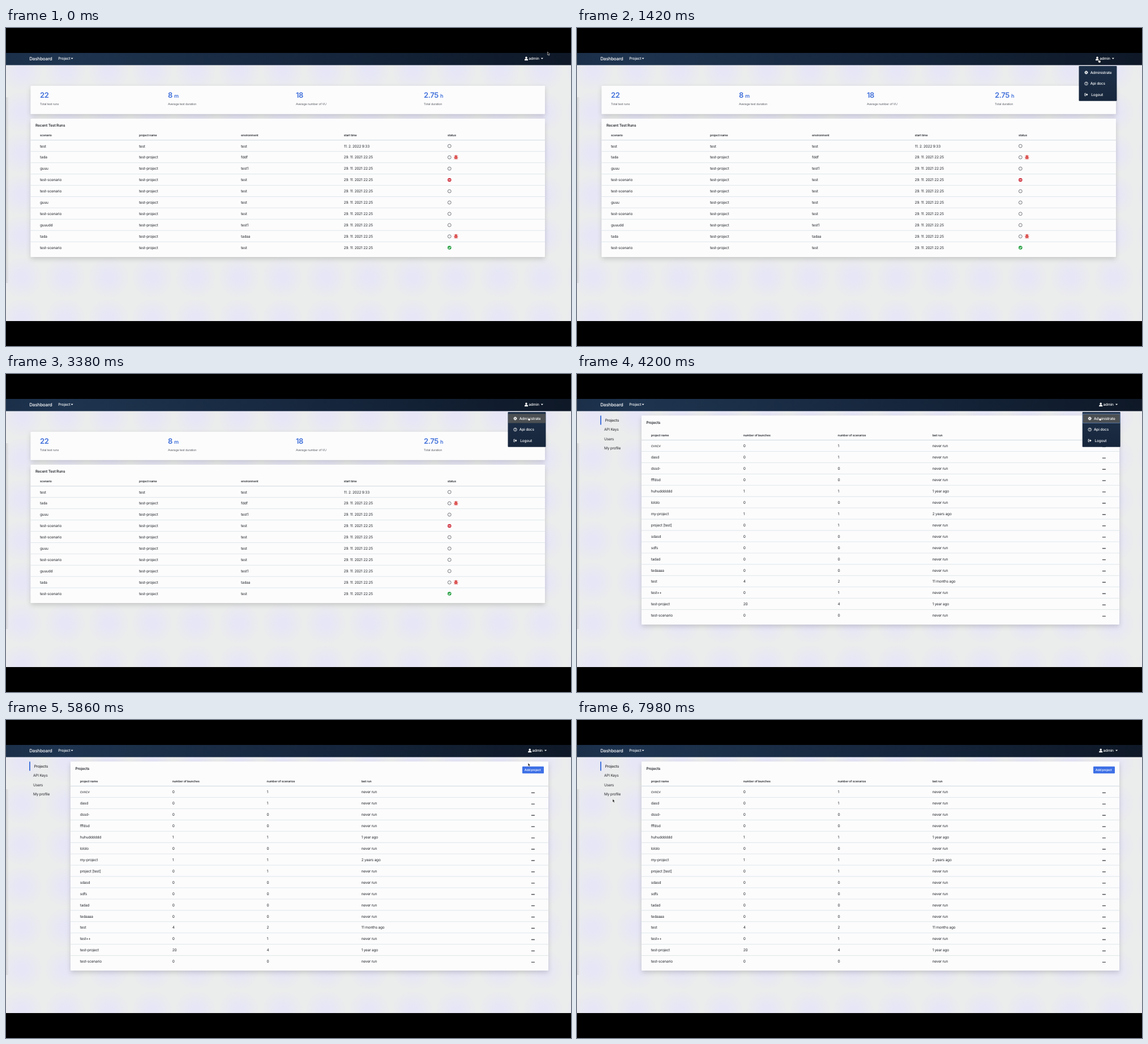
Recreate the animation shown at these times as an HTML page. Size 998x561 px, loop 8000 ms.

```html
<!DOCTYPE html>
<html lang="en">
<head>
<meta charset="utf-8">
<title>Test run dashboard</title>
<style>
  html, body { margin: 0; width: 100%; height: 100%; overflow: hidden; background: #000; }
  svg { display: block; width: 100vw; height: 100vh; }
  text {
    font-family: Inter, "Liberation Sans", sans-serif;
    font-size: 6.5px; letter-spacing: -.03em; fill: #25282c;
    text-rendering: geometricPrecision;
  }
  .title { font-weight: 600; letter-spacing: -.02em; }
  .head { font-size: 5.2px; font-weight: 600; letter-spacing: -.02em; }
  .label { font-size: 5.3px; fill: #5a5d62; }
  .big { font-size: 13px; font-weight: 600; fill: #3f6fda; }
  .unit { font-size: 9px; font-weight: 600; fill: #3f6fda; }
  .nav { fill: #fff; font-weight: 500; letter-spacing: -.02em; }
  .brand { font-size: 8px; }
  .button { font-size: 5.5px; fill: #fff; font-weight: 500; }
  .card { fill: #fcfcfd; filter: url(#shadow); }
</style>
</head>
<body>
<svg viewBox="0 0 998 561" preserveAspectRatio="none">
  <defs>
    <linearGradient id="bar">
      <stop offset="0" stop-color="#1b2f49"/>
      <stop offset=".1" stop-color="#1e344f"/>
      <stop offset=".6" stop-color="#15253b"/>
      <stop offset="1" stop-color="#0e1827"/>
    </linearGradient>
    <linearGradient id="panel" x2="0" y2="1">
      <stop offset="0" stop-color="#1d3049"/>
      <stop offset="1" stop-color="#17263b"/>
    </linearGradient>
    <radialGradient id="glow">
      <stop offset=".2" stop-color="#e6e6f7"/>
      <stop offset="1" stop-color="#e6e6f7" stop-opacity="0"/>
    </radialGradient>
    <pattern id="tint" x="-10.4" y="38.5" width="76.7" height="73" patternUnits="userSpaceOnUse">
      <circle cx="38.4" cy="36.5" r="36" fill="url(#glow)"/>
    </pattern>
    <linearGradient id="edge">
      <stop offset="0" stop-color="#888" stop-opacity=".25"/>
      <stop offset="1" stop-color="#888" stop-opacity="0"/>
    </linearGradient>
    <filter id="shadow" x="-5%" y="-20%" width="110%" height="150%">
      <feDropShadow dx="0" dy="3.5" stdDeviation="4" flood-color="#000" flood-opacity=".16"/>
    </filter>
  </defs>
  <rect y="44" width="998" height="473" fill="#ebecec"/>
  <rect y="44" width="998" height="473" fill="url(#tint)"/>
  <rect y="122" width="5" height="328" fill="url(#edge)"/>
  <g id="dashboard"></g>
  <g id="projects"></g>
  <g id="nav"></g>
  <path d="M0 0H998V44H0ZM0 517H998V561H0Z"/>
  <g id="cursor">
    <path id="arrow" d="M0 0V5.6L1.3 4.5L2.2 6.6L3.2 6.2L2.3 4.1H4Z" fill="#111" stroke="#fff" stroke-width=".5"/>
    <path id="hand" d="M.2 .6Q.7-.2 1.2 .6V2.7L4 3.3Q4.5 3.5 4.3 4.5L3.8 7H1L-1 4.4Q-.9 3.6 .2 4.4Z" fill="#fff" stroke="#111" stroke-width=".6"/>
  </g>
</svg>
<script>
const LOOP = 8000, MENU_OPEN = 1100, MENU_CLOSE = 5000, PAGE_SWITCH = 4180;
const STEP = 19.93;
const $ = id => document.getElementById(id);

const text = (x, y, s, cls = '') => `<text x="${x}" y="${y}" class="${cls}">${s}</text>`;
const rect = (x, y, w, h, attrs) => `<rect x="${x}" y="${y}" width="${w}" height="${h}" ${attrs}/>`;
const card = (x, y, w, h) => rect(x, y, w, h, 'rx="1" class="card"');
const caret = x => `<path d="M${x} 52.8h4.2l-2.1 2.3z" fill="#fff"/>`;
const rule = (x1, x2, y, color) => `<path d="M${x1} ${y}H${x2}" stroke="${color}" stroke-width=".8"/>`;

function table(x1, x2, top, cols, heads, rows, extra) {
  let out = heads.map((s, i) => text(cols[i], top - 7.1, s, 'head')).join('');
  rows.forEach((row, r) => {
    const y = top + 10.4 + r * STEP;
    out += rule(x1, x2, top + r * STEP, r ? '#d9e1e4' : '#c5ced3');
    out += row.map((s, i) => text(cols[i], y + 2.3, s)).join('');
    out += extra(r, y);
  });
  return out;
}

function bug(y) {
  return `<g transform="translate(794.8 ${y - .3})" stroke="#d63a38" fill="none" stroke-width=".9">
    <path d="M-3.8 .4H3.8M-3.3-3L-1.8-1.5H1.8L3.3-3M-3.3 3.6L-1.6 2M3.3 3.6L1.6 2"/>
    <rect x="-1.8" y="-1.6" width="3.6" height="5" rx="1.6" fill="#d63a38"/>
    <path d="M-1.6-2.2a1.6 1.6 0 0 1 3.2 0z" fill="#d63a38" stroke="none"/>
    <path d="M0-.5V3.6" stroke="#fff" stroke-width=".5"/></g>`;
}

function status(r, y) {
  const mark = (fill, d) => `<circle cx="783.3" cy="${y}" r="3.3" fill="${fill}"/>
    <path d="M783.3 ${y}${d}" fill="none" stroke="#fff" stroke-width="1.1"/>`;
  if (r === 3) return mark('#cf3440', 'm-2 0h4');
  if (r === 9) return mark('#27a043', 'm-1.7 0l1.2 1.2l2.3-2.3');
  return `<circle cx="783.3" cy="${y}" r="2.9" fill="none" stroke="#4a4d52" stroke-width=".75"/>`
    + (r === 1 || r === 8 ? bug(y) : '');
}

function buildDashboard() {
  const stats = [
    [60, '22', 'Total test runs'],
    [286, '8', 'Average test duration', 297, 'm'],
    [512, '18', 'Average number of VU'],
    [738, '2.75', 'Total duration', 767, 'h'],
  ];
  const date = '29. 11. 2021 22:25', p = 'test-project', s = 'test-scenario';
  const runs = [
    ['test', 'test', 'test', '11. 2. 2022 9:33'],
    ...[['tada', 'fddf'], ['guuu', 'test1'], [s, 'test'], [s, 'test'], ['guuu', 'test'],
      [s, 'test'], ['guuudd', 'test1'], ['tada', 'tadaa'], [s, 'test']]
      .map(([name, env]) => [name, p, env, date]),
  ];
  $('dashboard').innerHTML = card(43.5, 102, 908.5, 49.7) + card(43.5, 160, 908.5, 244)
    + stats.map(([x, n, label, ux, unit]) => text(x, 122.8, n, 'big')
      + text(x, 136, label, 'label') + (unit ? text(ux, 122.8, unit, 'unit') : '')).join('')
    + text(52, 173.8, 'Recent Test Runs', 'title')
    + table(43.5, 952, 197.8, [60, 235, 415, 596.7, 780],
      ['scenario', 'project name', 'environment', 'start time', 'status'], runs, status);
}

function buildProjects() {
  const rows = [
    'cvxcv,0,1', 'dasd,0,1', 'dssd-,0,0', 'fffdsd,0,0', 'huhudddddd,1,1,1 year ago',
    'lololo,0,0', 'my-project,1,1,2 years ago', 'project [test],0,1', 'sdasd,0,0', 'sdfs,0,0',
    'tadad,0,0', 'tedaaaa,0,0', 'test,4,2,11 months ago', 'test++,0,1',
    'test-project,20,4,1 year ago', 'test-scenario,0,0',
  ].map(line => {
    const [name, launches, scenarios, last = 'never run'] = line.split(',');
    return [name, launches, scenarios, last];
  });
  const dots = (r, y) => [928.9, 930.9, 932.9]
    .map(x => `<circle cx="${x}" cy="${y + 1.3}" r=".85" fill="#25282c"/>`).join('');
  $('projects').innerHTML = card(114, 73.3, 844, 368.7)
    + rect(41, 73.5, 2, 16, 'fill="#4575dc"')
    + text(49.7, 84, 'Projects', 'nav" style="fill:#25282c')
    + ['API Keys', 'Users', 'My profile'].map((s, i) => text(48, 100.3 + i * 16.2, s)).join('')
    + text(122.5, 87.8, 'Projects', 'title')
    + rect(912, 82, 38, 12.2, 'rx="1" fill="#3e70e6"') + text(915.8, 90.1, 'Add project', 'button')
    + table(114, 958, 116.6, [130.7, 293.7, 460.6, 627.7],
      ['project name', 'number of launches', 'number of scenarios', 'last run'], rows, dots);
}

function buildNav() {
  const icon = (y, body) => `<g transform="translate(899.5 ${y})" fill="none" stroke="#fff">${body}</g>`;
  $('nav').innerHTML = rect(0, 44, 998, 21.5, 'fill="url(#bar)"')
    + text(41.2, 56.8, 'Dashboard', 'nav brand') + text(92.3, 56.3, 'Project', 'nav') + caret(114.5)
    + '<g id="account">'
    + '<g fill="#fff"><circle cx="919" cy="52.3" r="1.7"/><path d="M916 57.2v-1q0-1.9 2-1.9h2q2 0 2 1.9v1z"/></g>'
    + text(923.3, 56.3, 'admin', 'nav') + caret(944.8)
    + '<g id="menu">' + rect(886.5, 67, 67, 61.8, 'rx="1" fill="url(#panel)"')
    + rect(887, 70.3, 66, 16.2, 'id="hover" fill="#4c5053"')
    + icon(78.5, '<circle r="1.7" stroke-width="1.5"/><circle r="2.7" stroke-width="1" stroke-dasharray="1.06"/>')
    + icon(98, '<circle r="2.8" stroke-width=".8"/><path d="M-.9-.7q.1-.9 .9-.9q1 0 1 .8q0 .6-1 .9v.3M0 1v.8" stroke-width=".7"/>')
    + icon(117.5, '<path d="M-.8-2.2H-2.5V2.2H-.8" stroke-width=".9"/><path d="M-1.2-.8H.6V-2.2L3 0L.6 2.2V.8H-1.2z" fill="#fff" stroke="none"/>')
    + text(906.7, 80.8, 'Administrate', 'nav') + text(906.7, 100.3, 'Api docs', 'nav')
    + text(908.2, 119.8, 'Logout', 'nav') + '</g></g>';
}

const path = [
  [0, 956.5, 42], [950, 920.8, 54.3], [1600, 920.8, 54.3], [2300, 922, 65.6], [2480, 922, 65.6],
  [3150, 922, 75.4], [5950, 922.2, 75.8], [7600, 63, 139.5], [LOOP, 63, 139.5],
];

function pointer(t) {
  const i = path.findIndex(k => k[0] > t);
  const [t0, x0, y0] = path[i - 1], [t1, x1, y1] = path[i];
  const u = (t - t0) / (t1 - t0), e = u * u * (3 - 2 * u);
  return [x0 + (x1 - x0) * e, y0 + (y1 - y0) * e];
}

const show = (id, on) => $(id).setAttribute('display', on ? 'inline' : 'none');

function draw(t) {
  const [x, y] = pointer(t);
  const admin = t >= PAGE_SWITCH, open = t >= MENU_OPEN && t < MENU_CLOSE;
  const hover = open && y > 70.3;
  const onAccount = x > 914 && x < 950 && y > 46 && y < 63;
  show('dashboard', !admin);
  show('projects', admin);
  show('menu', open);
  show('hover', hover);
  show('hand', hover || onAccount);
  show('arrow', !hover && !onAccount);
  $('hover').setAttribute('stroke', admin ? '#6486bd' : 'none');
  $('hover').setAttribute('stroke-width', .7);
  $('account').setAttribute('transform', `translate(${admin ? 6.2 : 0} 0)`);
  $('cursor').setAttribute('transform', `translate(${x} ${y})`);
}

buildDashboard();
buildProjects();
buildNav();
const start = performance.now();
function tick() {
  draw((performance.now() - start) % LOOP);
  requestAnimationFrame(tick);
}
tick();
</script>
</body>
</html>
```
